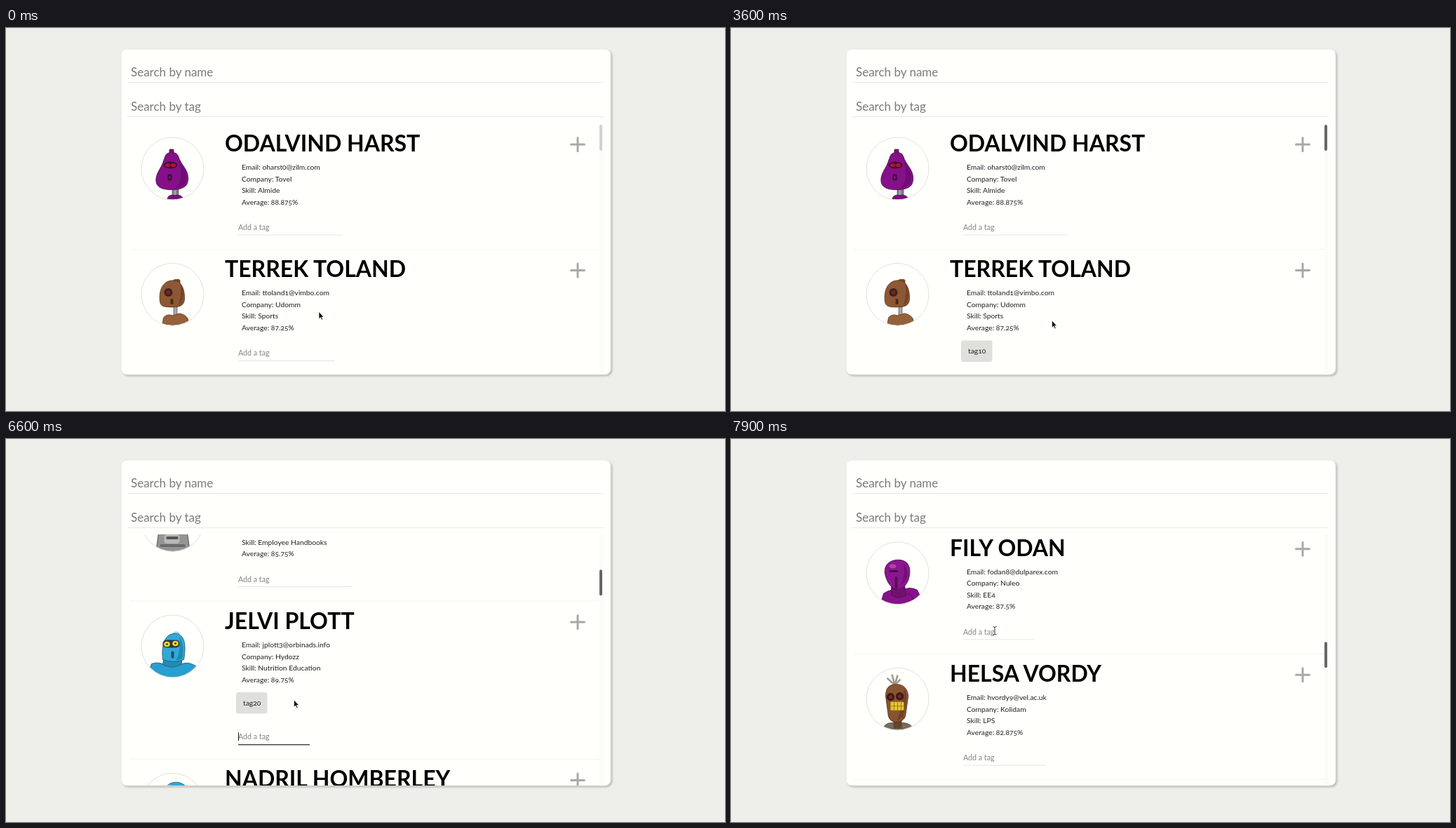
An HTML page that plays this animation: 1025 by 546 pixels, repeating every 8 s.

```html
<!DOCTYPE html>
<html lang="en">
<head>
<meta charset="utf-8">
<title>Profile list</title>
<style>
  html, body { margin: 0; width: 100%; height: 100%; overflow: hidden; background: #eeeeea; }
  svg { display: block; font: 10.3px Lato, "Open Sans", sans-serif; font-variant-numeric: oldstyle-nums; }
  text { white-space: pre; fill: #202020; }
  .card { fill: #fffffc; stroke: #e6e6e2; filter: drop-shadow(2px 2px 1px #0003); }
  .search { font-size: 17px; fill: #7a7a77; }
  .name { font-size: 32px; font-weight: 700; fill: #000; }
  .hint { font-size: 10.7px; fill: #858582; }
  .plus { stroke: #a8a8a5; stroke-width: 3; stroke-linecap: round; }
</style>
</head>
<body>
<svg width="1025" height="546">
  <defs>
    <clipPath id="view"><path d="M164 136H862V486a8 8 0 0 1-8 8H172a8 8 0 0 1-8-8Z"/></clipPath>
    <clipPath id="round"><circle r="44"/></clipPath>
  </defs>
  <rect class="card" x="164" y="30" width="698" height="464" rx="8"/>
  <text class="search" x="178" y="69">Search by name</text>
  <text class="search" x="178" y="118">Search by tag</text>
  <path d="M173 77.5H852M173 126.5H852" stroke="#e8e8e4"/>
  <g clip-path="url(#view)">
    <rect x="846" y="136" width="5" height="358" fill="#fbfbf8"/>
    <g id="list"></g>
  </g>
  <rect id="thumb" x="846" width="4" height="37" rx="2"/>
  <g stroke-linejoin="round">
    <path id="arrow" d="M0 0V10.2L2.4 8.1 4 11.7 5.5 11 4 7.6H7Z" fill="#111" stroke="#fff" stroke-width=".6"/>
    <path id="beam" d="M-2.5-5.5Q0-5.5 0-4 0-5.5 2.5-5.5M0-4V4.5M-2.5 6Q0 6 0 4.5 0 6 2.5 6" fill="none" stroke="#333"/>
  </g>
</svg>
<script>
const $ = id => document.getElementById(id);

// Avatar parts, relative to the avatar centre
const shape = (d, fill, line = '#4a4642', w = .9) =>
  `<path d="${d}" fill="${fill}" stroke="${line}" stroke-width="${w}"/>`;
const oval = (x, y, rx, ry, fill) => `<ellipse cx="${x}" cy="${y}" rx="${rx}" ry="${ry}" fill="${fill}"/>`;
const box = (x, y, w, h, fill, r = 1.5) =>
  `<rect x="${x}" y="${y}" width="${w}" height="${h}" rx="${r}" fill="${fill}"/>`;

const pear = box(-1, 26, 10, 14, '#77777b') + box(2, 26, 3, 14, '#a5a5a8') +
  shape('M-8 45Q-7 36 3 38 14 36 16 45Z', '#7d0d82', '#4d1152') +
  box(-5, -28, 7, 8, '#6b1c4c') +
  shape('M-10-19Q-8-23-1-23 6-23 8-18C10-11 14-6 18 0 22 7 24 15 20 23 15 29 7 30-2 30-12 30-20 28-23 21-25 13-22 7-18 0-14-6-13-12-10-19Z',
    '#86108a', '#4d1152') +
  shape('M8-14C13-6 19 2 20 12 20 21 14 27 4 28 13 18 14 4 8-14Z', '#6f0d74', 'none') +
  oval(-3, -5, 10, 5, '#3d1033') + oval(-7, -5, 3.5, 2.6, '#b5152b') + oval(1, -5, 3.5, 2.6, '#b5152b') +
  box(-7, 8, 6, 9, '#3d0b3a') + box(-5, 10, 2, 5, '#77277b');
const egg = box(1, 16, 6, 14, '#8a8a8c') + box(3, 16, 2, 14, '#b4b4b5') +
  shape('M-15 46-13 33Q-8 27 0 30L10 27Q19 29 22 35V46Z', '#96603a', '#5d3a22') +
  box(1, -22, 10, 8, '#7a4a2a', 3) +
  shape('M-18 10C-20-6-14-19-1-20 12-21 17-9 17 5 17 15 12 18-1 18-12 18-17 17-18 10Z', '#8d5833', '#5d3a22') +
  shape('M11-15C17-8 18 12 8 16 12 4 12-6 11-15Z', '#744628', 'none') +
  oval(-6, -3, 6, 6, '#43201d') + oval(-6, -3, 2.6, 2.6, '#702b2e') + box(-3, 6, 4, 8, '#4a2a18');
const steel = shape('M-18 20Q-19-18 0-20 19-18 18 20Z', '#aaa9a9') + oval(-7, -2, 4, 4, '#444') +
  oval(7, -2, 4, 4, '#444') + shape('M-24 46-20 18Q0 10 21 18L25 46Z', '#959393') +
  box(-12, 20, 22, 13, '#b9b7b7', 4) + box(-9, 23, 17, 4, '#555353') + box(-18, 34, 36, 4, '#6b6969');
const diver = shape('M-38 46-30 25Q-18 21-10 28L10 27Q20 20 33 28L38 46Z', '#279fd0', '#2a5d70') +
  shape('M-14 26Q0 34 13 25V14H-12Z', '#208cba', '#2a5d70') +
  oval(5, -18, 5, 3, '#8ed4ea') +
  shape('M-14 19C-16 2-13-18 3-18 19-18 19 1 16 19Q1 25-14 19Z', '#30a9da', '#2a5d70') +
  shape('M10-13C16-5 16 11 13 18L5 20Q12 6 10-13Z', '#2188b4', 'none') +
  box(-14, -9, 24, 11, '#2b3a3d', 5) + oval(-8, -3, 4.3, 3.8, '#f0d62c') + oval(4, -4, 4.3, 3.8, '#f0d62c') +
  oval(-8, -3, 1.5, 1.2, '#333') + oval(4, -4, 1.5, 1.2, '#333') + box(-2, 7, 4, 10, '#1f5369');
const wave = shape('M-24 46Q-16 29 4 29 20 30 25 46Z', '#2b9cc9', '#2a5d70') +
  shape('M-17 28C-18 2-16-28 0-31 13-34 24-25 21-13L12-12Q10 6 14 28Q-3 35-17 28Z', '#32a8d8', '#2a5d70') +
  oval(-5, -22, 6, 6, '#a4b9c5') + oval(-5, -22, 2.8, 2.8, '#c53d3a') +
  box(-12, -7, 6, 4, '#1f4355') + box(0, -7, 7, 4, '#1f4355') + box(-5, 7, 5, 10, '#1f5369');
const hood = shape('M-30 46Q-25 26-9 28L8 24Q25 22 34 46Z', '#e2d925', '#7a7228') +
  shape('M-28-29-2-25 22-34M-16-37-2-25 10-38M-2-25V-17', 'none', '#947668', 1.6) +
  shape('M-22 23C-25 8-14-17-2-20 11-18 17 2 21 19Q14 30-3 30-17 30-22 23Z', '#f1e932', '#7a7228') +
  shape('M8-10C16 0 21 18 17 23L6 28Q15 11 8-10Z', '#cfc62a', 'none') +
  shape('M-14-5Q-2-11 8-4L6 2Q-3-2-12 2Z', '#4d4a24') + oval(-8, -2, 3, 1.5, '#ddd35c') +
  oval(2, -2, 3, 1.5, '#ddd35c') + shape('M-10 13Q-2 17 7 12M-3 4V9M-5 11V16M1 11V16', 'none', '#554f1c');
const orb = shape('M-25 46-20 29Q-9 21 5 25 17 18 28 24L39 46Z', '#86128a', '#4d1152') +
  shape('M-9 9H9L12 32Q0 38-9 31Z', '#73106f', '#4d1152') +
  shape('M-18 1C-20-12-11-19 1-19 14-19 19-10 17 3 15 15 8 23 0 23-9 22-15 14-18 1Z', '#8a168e', '#4d1152') +
  shape('M8-14Q16-5 13 6 10 14 4 18 12 3 8-14Z', '#701074', 'none') +
  oval(-7, -10, 5, 3, '#a646a7') + box(-12, -4, 13, 2.5, '#3d0d41') + box(-4, 5, 4, 17, '#560f5a') +
  shape('M14 29Q23 31 24 45', 'none', '#4b0a50');
const totem = shape('M-23 46Q-18 33-8 34H8Q19 34 25 46Z', '#796b5e', '#4d3a2e') +
  box(-6, 28, 12, 14, '#62452f') +
  shape('M-4-20-15-30M-4-20-8-35M-4-20 0-34M-4-20 4-28', 'none', '#a39a8c', 2.6) +
  shape('M-17-4C-17-16-12-21-2-21 9-21 15-14 15-3L11 25Q7 33-2 33-10 33-13 25Z', '#895331', '#553520') +
  shape('M9-15Q14-9 12 3L8 26-1 31Q7 11 9-15Z', '#70422a', 'none') +
  oval(-10, -3, 5.6, 5.6, '#381b17') + oval(3, -4, 5.6, 5.6, '#381b17') + oval(-10, -3, 2.5, 2.5, '#852820') +
  oval(3, -4, 2.5, 2.5, '#852820') + box(-10, 4, 19, 12, '#e5c72b') +
  shape('M-10 10H9M-5 4V16M0 4V16M5 4V16', 'none', '#8a7020', .8);

// name, email, company, skill, average, right end of the input, avatar
const people = [
  ['ODALVIND HARST', 'oharst0@zilm.com', 'Tovel', 'Almide', '88.875', 480, pear],
  ['TERREK TOLAND', 'ttoland1@vimbo.com', 'Udomm', 'Sports', '87.25', 469, egg],
  ['GARVIT DOMSEL', 'gdomsel2@tinlope.com', 'Rimvee', 'Employee Handbooks', '85.75', 494, steel],
  ['JELVI PLOTT', 'jplott3@orbinads.info', 'Hydozz', 'Nutrition Education', '89.75', 433, diver],
  ['NADRIL HOMBERLEY', 'nhomberley4@dralgovist.org', 'Orovee', 'Budgeting', '84.5', 452, wave],
  ['PELLO VARNISK', 'pvarnisk5@molten.net', 'Kelvado', 'Negotiation', '86.125', 470, steel],
  ['SORREL DAMPY', 'sdampy6@quillor.com', 'Jolimba', 'Drafting', '83.25', 445, egg],
  ['TANNNIE OWEL', 'towel7@zandomantor.com', 'Fondclob', 'Tolmen', '89.25', 460, hood],
  ['FILY ODAN', 'fodan8@dulparex.com', 'Nuleo', 'EE4', '87.5', 432, orb],
  ['HELSA VORDY', 'hvordy9@vel.ac.uk', 'Kolidam', 'LPS', '82.875', 449, totem],
  ['BRANTO KELIDE', 'bkelide10@sorvane.com', 'Plinder', 'Logistics', '85.5', 456, wave]
];

const line = (label, value, i) => `<text x="336" y="${66 + i * 16.5}">${label}: ${value}</text>`;

$('list').innerHTML = people.map(([name, email, company, skill, avg, end, bot], i) => `<g>
  ${i ? '<path d="M176 0H846" stroke="#f2f2ee"/>' : ''}
  <g transform="translate(237.5 64.5)">
    <g clip-path="url(#round)">${bot}</g><circle r="44.5" fill="none" stroke="#e0e0dc"/>
  </g>
  <text class="name" x="312" y="40">${name}</text>
  <path class="plus" d="M805.5 30H824.5M815 20.5V39.5"/>
  ${line('Email', email, 0)}${line('Company', company, 1)}${line('Skill', skill, 2)}
  ${line('Average', avg + '%', 3)}
  <g class="pill" display="none"><rect x="328" y="130" width="44.5" height="30.6" rx="3" fill="#dfdfdc"/>
    <text x="338" y="149"></text></g>
  <g class="input"><path d="M331 159H${end}" stroke="#e5e5e1"/>
    <path class="focus" d="M331 159.3H${end}" stroke="#4a4a48" stroke-width="1.4"/>
    <text class="hint" x="331" y="152">Add a tag</text><text class="value" x="331" y="152"></text>
    <path class="caret" d="M0 142V154" stroke="#111"/></g>
</g>`).join('');

const rows = [...$('list').children].map(el => {
  const row = { el };
  for (const c of ['pill', 'input', 'focus', 'hint', 'value', 'caret']) row[c] = el.querySelector('.' + c);
  row.label = row.pill.querySelector('text');
  return row;
});

const edits = {
  1: { focus: 1200, blur: 4900, done: 3300, tag: 'tag10',
       typed: [[1800, 'tag'], [2400, 'tag1'], [2600, 'tag10'], [3300, '']] },
  3: { focus: 4900, blur: 8000, done: 6600, tag: 'tag20',
       typed: [[5400, 'ta'], [5600, 'tag'], [5900, 'tag2'], [6300, 'tag20'], [6600, '']] }
};
const scrollKeys = [[3700, 0], [3800, 35], [3900, 90], [4200, 90], [4300, 130], [4400, 270], [4500, 390],
  [4600, 460], [4700, 489.2], [6900, 489.2], [7000, 760], [7100, 1130], [7200, 1378], [7300, 1430],
  [7500, 1490], [7800, 1536.4]];
const mouseKeys = [[100, 446, 404.5], [200, 427.5, 424], [300, 427.5, 424], [400, 414.5, 442], [500, 414.5, 442],
  [600, 410, 447], [1000, 399.5, 461.5], [3200, 399.5, 461.5], [3600, 457.5, 417], [4200, 457.5, 417],
  [4700, 410.5, 372], [7300, 410.5, 372], [7800, 396, 330], [7900, 376, 273]];

function tween(keys, t) {
  const i = keys.findIndex(k => k[0] > t);
  if (i < 0) return keys.at(-1).slice(1);
  if (!i) return keys[0].slice(1);
  const a = keys[i - 1], b = keys[i], f = (t - a[0]) / (b[0] - a[0]);
  return a.slice(1).map((v, j) => v + (b[j + 1] - v) * f);
}
const show = (el, on) => el.setAttribute('display', on ? 'inline' : 'none');
const move = (el, x, y) => el.setAttribute('transform', `translate(${x} ${y})`);

function draw(t) {
  const [scroll] = tween(scrollKeys, t), [mx, my] = tween(mouseKeys, t);
  const fade = Math.min(1, Math.max(0, (t - 1100) / 200));
  let y = 136 - scroll;

  rows.forEach((row, i) => {
    const e = edits[i], focused = e && t >= e.focus && t < e.blur, tagged = e && t >= e.done;
    const typed = e ? (e.typed.findLast(k => t >= k[0]) || [0, ''])[1] : '';
    const shift = tagged ? 45.4 : 0;
    move(row.el, 0, y);
    move(row.input, 0, shift);
    show(row.pill, tagged);
    show(row.focus, focused);
    show(row.hint, !typed);
    show(row.caret, focused && !(t >= 6100 && t < 6300));
    row.focus.setAttribute('opacity', fade);
    row.value.textContent = typed;
    if (tagged) row.label.textContent = e.tag;
    if (focused) move(row.caret, 331.5 + (typed ? row.value.getComputedTextLength() : 0), 0);
    y += 179.4 + shift + (e && t >= e.focus ? .6 : 0);
  });

  $('thumb').setAttribute('y', 138 + scroll * .0984);
  $('thumb').setAttribute('fill-opacity', .16 + .43 * fade);
  const text = t >= 800 && t < 2900 || t >= 4700 && t < 6300 || t >= 7900;
  show($('beam'), text);
  show($('arrow'), !text);
  move($('beam'), mx, my);
  move($('arrow'), mx, my);
}

const start = performance.now();
function tick() {
  const t = (performance.now() - start) % 8000;
  draw(Math.floor(t / 100) * 100);
  requestAnimationFrame(tick);
}
tick();
</script>
</body>
</html>
```
